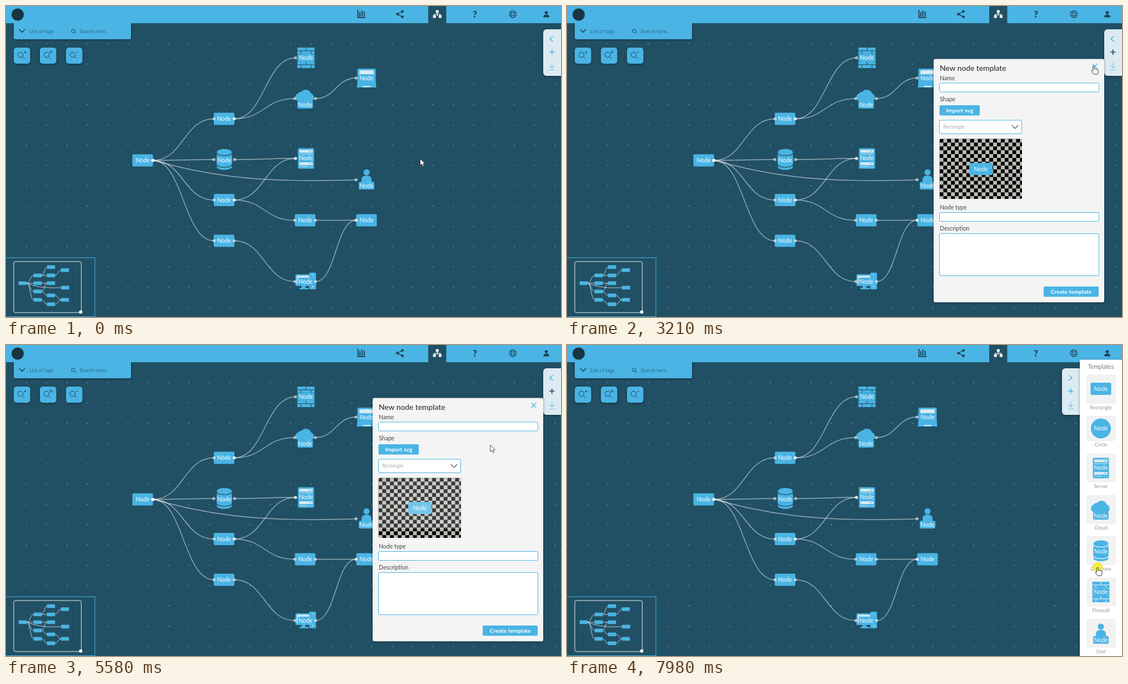
Animation of 999 by 561 pixels, one loop 8 s. Source, as an HTML page:

```html
<!DOCTYPE html>
<html lang="en">
<head>
<meta charset="utf-8">
<title>Node editor</title>
<style>
html, body { margin: 0; width: 100%; height: 100%; overflow: hidden; background: #215064; }
svg { display: block; width: 999px; height: 561px; font-family: Lato, "Open Sans", sans-serif; }
.shadow { filter: drop-shadow(0 1px 2px rgba(0, 0, 0, .4)); }
</style>
</head>
<body>
<svg id="stage" viewBox="0 0 999 561"></svg>
<script>
const BLUE = '#4ab4e4', DARK = '#215064', INK = '#1d4356', PALE = '#dceaf1';

const rect = (x, y, w, h, fill = BLUE, r = 0, extra = '') =>
  `<rect x="${x}" y="${y}" width="${w}" height="${h}" rx="${r}" fill="${fill}" ${extra}/>`;
const circle = (x, y, r, fill = BLUE, extra = '') =>
  `<circle cx="${x}" cy="${y}" r="${r}" fill="${fill}" ${extra}/>`;
const fillPath = (d, fill = BLUE) => `<path d="${d}" fill="${fill}"/>`;
const line = (d, color, width = 1, extra = '') =>
  `<path d="${d}" fill="none" stroke="${color}" stroke-width="${width}" ${extra}/>`;
const text = (s, x, y, size, fill, anchor = 'start', weight = 400) =>
  `<text x="${x}" y="${y + size * .35}" font-size="${size}" fill="${fill}" text-anchor="${anchor}" font-weight="${weight}">${s}</text>`;
const group = (x, y, body, extra = '') => `<g transform="translate(${x} ${y})" ${extra}>${body}</g>`;
const label = y => text('Node', 0, y, 10.5, '#fff', 'middle');
const tag = (y, x = 0) => group(x, 0, rect(-14, y - 7, 28, 14, BLUE, 2.5) + label(y));

// Node shapes around their centre; gap is the colour seen through the seams.
const shapes = {
  rectangle: () => rect(-18.5, -11, 37, 22, BLUE, 2) + label(0),
  circle: () => circle(0, 0, 18) + label(0),
  server: () => {
    const slot = y => rect(-12, y, 24, 5, PALE, .5) + line(`M5 ${y + 2.5}H10`, BLUE);
    return rect(-14.5, -18.5, 29, 37, BLUE, 2) + slot(-15.5) + slot(-8.5) + slot(7) +
      line('M-12 14.8H3', PALE) + circle(7, 15, .8, PALE) + circle(10, 15, .8, PALE) + tag(-.5);
  },
  cloud: () => fillPath('M-12 4.5a7 7 0 0 1-1-13.5a6 6 0 0 1 6-3a10.5 10.5 0 0 1 18 3a7.5 7.5 0 0 1 1 13.5z') + tag(11),
  database: gap => {
    const seam = y => line(`M-14 ${y}C-11 ${y + 6.5} 11 ${y + 6.5} 14 ${y}`, gap, 1.3);
    return fillPath('M-13.5-13C-13.5-21 13.5-21 13.5-13V13C13.5 20.5-13.5 20.5-13.5 13Z') +
      seam(-12) + seam(-1) + seam(9) + tag(1);
  },
  firewall: gap => {
    let bricks = rect(-15.5, -18.5, 31, 37);
    for (let i = 0; i < 6; i++) {
      const y = -18.5 + i * 6.25;
      if (i) bricks += line(`M-15.5 ${y - .4}h31`, gap, 1.1);
      const seams = i % 2 ? [-9, 9] : [0];
      for (const x of seams) bricks += line(`M${x} ${y}v6`, gap, 1.1);
    }
    return bricks + tag(0);
  },
  user: () => circle(0, -12, 5.5) + fillPath('M-9 6V1Q-9-6 0-6T9 1V6Z') + tag(12),
  laptop: () => rect(-16.5, -17, 33, 28, BLUE, 2.5) + rect(-13, -14, 26, 20, PALE, 1.5) +
    fillPath('M-16.5 7H16.5L17.5 17H-17.5Z') + rect(-7, 14.5, 14, 1.6, '#fff') + tag(0),
  desktop: () => rect(-18, -13, 26, 21, BLUE, 1.5) + rect(-15.5, -10.5, 22, 15, PALE) +
    rect(-7, 8, 7, 4) + rect(-11, 11.5, 17, 2.5, BLUE, 1) + rect(7, -16, 12, 30, BLUE, 1.5) +
    circle(13, -12, .8, '#fff') + circle(13, 9, 1, '#fff') + tag(0)
};

// shape, centre, centre in the minimap
const nodes = {
  root: ['rectangle', 246, 278.5, 30, 500],
  a: ['rectangle', 392.5, 203.5, 57, 486],
  db: ['database', 393, 277, 57, 500],
  b: ['rectangle', 392.5, 350, 57, 515],
  c: ['rectangle', 392.5, 423.5, 57, 530],
  wall: ['firewall', 540, 93.5, 81, 471],
  cloud: ['cloud', 538.5, 167, 81, 486],
  server: ['server', 540, 275, 81, 500],
  d: ['rectangle', 538.5, 386.5, 81, 522],
  pc: ['desktop', 539, 497, 81, 538],
  laptop: ['laptop', 649, 130, 106, 476.5],
  user: ['user', 649, 313.5, 106.5, 508],
  e: ['rectangle', 649, 386.5, 106, 530]
};
const edges = ('root-a root-db root-b root-c root-user a-wall a-cloud cloud-laptop db-server ' +
  'b-server b-d d-e c-pc pc-e').split(' ').map(e => e.split('-'));

function curve(x1, y1, x2, y2, long) {
  const w = x2 - x1, h = y2 - y1;
  return long
    ? `M${x1} ${y1}C${x1 + w * .25} ${y1 + h * .68} ${x1 + w * .46} ${y1 + h * 1.2} ${x2} ${y2}`
    : `M${x1} ${y1}C${x1 + w / 2} ${y1} ${x2 - w / 2} ${y2} ${x2} ${y2}`;
}

function graph() {
  let wires = '', ports = '', bodies = '';
  for (const [from, to] of edges) {
    const [, x1, y1] = nodes[from], [, x2, y2] = nodes[to];
    const start = x1 + 18.4, end = x2 - (to === 'a' || to === 'c' || to === 'b' ? 18 : 18.8);
    wires += line(curve(start, y1, end, y2, to === 'user'), 'rgba(255,255,255,.52)', 1.4);
    ports += circle(start, y1, 2.8, '#fff', 'opacity=".55"') + circle(end, y2, 2.8, '#fff', 'opacity=".55"');
  }
  for (const [shape, x, y] of Object.values(nodes))
    bodies += group(x, shape === 'user' ? y - 1.5 : y, shapes[shape](DARK));
  return wires + bodies + ports;
}

function minimap() {
  let out = rect(-1, 454, 161, 106.5, DARK, 0, `stroke="${BLUE}"`) +
    rect(14, 461, 121.5, 92, 'none', 3, 'stroke="#e6eef2"');
  for (const [from, to] of edges) {
    const [, , , x1, y1] = nodes[from], [, , , x2, y2] = nodes[to];
    out += line(curve(x1 + 7, y1, x2 - 7, y2, to === 'user'), '#e6eef2', .8);
  }
  for (const [, , , x, y] of Object.values(nodes)) out += rect(x - 7.3, y - 3.3, 14.6, 6.6);
  return out + circle(134.5, 552, 3, '#fff');
}

function header() {
  const zoom = (x, sign) => rect(x, 75, 29.5, 29, BLUE, 5, 'class="shadow"') +
    circle(x + 12, 88, 4.7, 'none', `stroke="${INK}"`) + line(`M${x + 15.5} 91.5l4 4`, INK) +
    line(sign, INK, .9);
  return rect(14, 25, 211, 35, BLUE, 3, 'class="shadow"') + rect(0, 0, 999, 31) +
    circle(21, 15.5, 11, '#183543') +
    line('M24 42l5 5.5l5-5.5', INK, 1.6) + text('List of tags', 42, 45.5, 9.2, '#2b6c8a') +
    circle(121, 45, 3.1, 'none', `stroke="${INK}"`) + line('M123.3 47.3l2.7 2.7', INK) +
    text('Search here..', 132.5, 46, 9, '#2b6c8a') +
    zoom(14, 'M32.5 83.5h4M34.5 81.5v4') + zoom(61, 'M79.5 81.5h3v3h-3z') + zoom(108, 'M126.5 83.5h3.5') +
    line('M633.5 7V20.8H647M637 11v8M640.7 8v11M644.7 10v9', INK, 2) +
    line('M713.5 9.8L704.5 14.7L713.5 19.7', INK, 1.4) + circle(713.5, 9.8, 2.4, INK) +
    circle(704.5, 14.7, 2.4, INK) + circle(713.5, 19.7, 2.4, INK) +
    rect(760, 0, 32.5, 31, DARK) + line('M776.3 11v7M771 18v-3h10.6v3', '#fff', 1.2) +
    rect(773.8, 7.5, 5, 5, '#fff') + rect(768.7, 16.5, 5, 5, '#fff') + rect(778.9, 16.5, 5, 5, '#fff') +
    text('?', 844, 14.7, 17, INK, 'middle', 900) +
    circle(912.3, 14.7, 6.2, 'none', `stroke="${INK}" stroke-width="1.1"`) +
    `<ellipse cx="912.3" cy="14.7" rx="2.8" ry="6.2" fill="none" stroke="${INK}"/>` +
    line('M906.3 12.5h12M906.3 17h12', INK) +
    circle(972.5, 12, 2.8, INK) + fillPath('M967.3 20.5v-1q0-4 5.2-4t5.2 4v1z', INK);
}

const toolbar = () => rect(967, 42, 40, 84, PALE, 6, 'class="shadow"') +
  `<g id="arrow">${line('M984.5 54.5l-5.5 4.7l5.5 4.7', BLUE, 1.5)}</g>` +
  `<path id="plus" d="M978 83.3h9.4M982.7 78.6v9.4" stroke-width="1.6"/>` +
  line('M982.7 102.5v9M978.5 108l4.2 4l4.2-4M977.5 115.5h10.4', '#7cc6e9', 1.2);

function modal() {
  const field = (y, h, w = 287) => rect(670.5, y, w, h, '#fff', 2.5, `stroke="${BLUE}"`);
  const caption = (s, y) => text(s, 671, y, 10.5, '#444');
  const button = (s, x, y, w) => rect(x, y, w, 18.5, BLUE, 2.5) +
    text(s, x + w / 2, y + 9.3, 10.3, '#fff', 'middle', 700);
  const options = ['Rectangle', 'Circle', 'Server', 'Cloud', 'Database'];
  return rect(660, 95.5, 307, 439, '#f4f4f4', 3, 'class="shadow"') +
    text('New node template', 671, 112, 13.8, '#333', 'start', 500) +
    '<path id="close" d="M945.5 104.3l9 9m0-9l-9 9" stroke-width="1.4"/>' +
    caption('Name', 130) + field(139, 16) +
    caption('Shape', 168) + button('Import svg', 670.5, 179, 72.5) +
    field(206, 24.5, 148) + text('Rectangle', 677, 218, 9, '#aaa') + line('M801 215l5.5 6l5.5-6', '#666', 1.4) +
    rect(670.5, 239.5, 148.5, 108.5, 'url(#checker)', 3) + group(745, 294, rect(-21, -11, 42, 22, BLUE, 2.5) + label(0)) +
    caption('Node type', 363.5) + field(372.5, 16) + caption('Description', 401.5) + field(410.5, 76) +
    button('Create template', 858, 506, 99) +
    `<g id="dropdown">${rect(670.5, 231, 148.5, 101, '#fff', 2, 'class="shadow"')}` +
    options.map((s, i) => text(s, 677, 242 + i * 20, 9, '#888')).join('') + '</g>';
}

function templates() {
  // shape, card top, card height, icon centre, caption
  const cards = [
    ['rectangle', 54, 51, 79, 'Rectangle'], ['circle', 128.5, 44, 150.5, 'Circle'],
    ['server', 196, 51, 222, 'Server'], ['cloud', 271, 51, 297, 'Cloud'],
    ['database', 345.5, 51, 371.5, 'Database'], ['firewall', 420, 51, 445.5, 'Firewall'],
    ['user', 494.5, 51, 520, 'User']];
  return rect(923, 26.5, 80, 540, '#fff', 0, 'class="shadow"') + '<g id="cards">' +
    text('Templates', 961, 39.5, 10.5, '#777', 'middle') +
    cards.map(([shape, y, h, cy, name]) => rect(936, y, 51, h, '#f2f2f2', 3, 'stroke="#e6e6e6" stroke-width=".6"') +
      group(961, cy, shapes[shape]('#f2f2f2')) + text(name, 961, y + h + 7.5, 9.1, '#999', 'middle')).join('') + '</g>';
}

let dots = '';
for (let y = 68; y < 561; y += 36.6)
  for (let x = 0; x < 999; x += 36.6) dots += circle(x.toFixed(1), y.toFixed(1), .75, '#a9bfc9');

const stage = document.getElementById('stage');
stage.innerHTML = `<defs><pattern id="checker" x="670.5" y="239.5" width="13.8" height="13.8" patternUnits="userSpaceOnUse">
  ${rect(0, 0, 13.8, 13.8, '#000') + rect(6.9, 0, 6.9, 6.9, '#bdbdb8') + rect(0, 6.9, 6.9, 6.9, '#bdbdb8')}</pattern></defs>` +
  rect(0, 0, 999, 561, DARK) + dots + graph() + minimap() + header() +
  `<g id="toolbar">${toolbar()}</g><g id="panel">${templates()}</g><g id="modal">${modal()}</g>` +
  `<g id="cursor">${circle(0, 0, 9.3, '#f6e71c', 'id="halo" opacity=".8"')}
  <path id="pointer" fill="#fff" stroke="#222" stroke-width=".8" stroke-linejoin="round" d="M0 0V12.2L2.9 9.6L4.9 14L6.9 13.1L5 8.8H8.8Z"/>
  <path id="hand" fill="#fff" stroke="#222" stroke-width=".9" stroke-linejoin="round" d="M-1.2 9V.8Q0-.9 1.2.8V5.6Q2.5 4.6 3.6 6Q5 5.2 6 6.6Q8.2 6 8.2 8V11L6.8 15.2H.2L-3.8 9.6Q-3.6 7.4-1.2 9Z"/></g>`;

const part = Object.fromEntries([...stage.querySelectorAll('[id]')].map(el => [el.id, el]));
const set = (name, key, value) => part[name].setAttribute(key, value);
const show = (name, alpha) => {
  set(name, 'opacity', alpha);
  set(name, 'display', alpha > 0 ? 'inline' : 'none');
};
const ramp = (t, from, to) => Math.min(1, Math.max(0, (t - from) / (to - from)));
const smooth = u => u * u * (3 - 2 * u);
const within = (t, spans) => spans.some(([from, to]) => t >= from && t < to);

// start, end, target, control point, time warp
const moves = [
  [310, 2000, 986, 80.5, 851, 126, .7],
  [2400, 3230, 948, 108, 972, 97, 1],
  [3640, 4150, 805.5, 210, 880, 155, 1],
  [5300, 6080, 951, 112, 901, 177, .85],
  [6200, 6850, 978, 54.5, 962, 85, 1],
  [7180, 7860, 955, 401, 955, 190, 1]];
const clicks = [[2050, 2200], [4330, 4430], [5200, 5340], [6150, 6250], [6890, 7030], [7890, 8000]];
const hands = [[3100, 3750], [3990, 5400], [7420, 8000]];

function cursorAt(t) {
  let x = 745.5, y = 275.5;
  for (const [from, to, endX, endY, midX, midY, warp] of moves) {
    if (t < from) break;
    const s = smooth(ramp(t, from, to) ** warp), r = 1 - s;
    x = r * r * x + 2 * r * s * midX + s * s * endX;
    y = r * r * y + 2 * r * s * midY + s * s * endY;
  }
  return [x, y];
}

function render() {
  const t = performance.now() % 8000;
  const [x, y] = cursorAt(t);
  set('cursor', 'transform', `translate(${x} ${y})`);
  show('halo', within(t, clicks) ? .8 : 0);
  const hand = within(t, hands);
  show('hand', hand ? 1 : 0);
  show('pointer', hand ? 0 : 1);

  const opening = smooth(ramp(t, 2050, 2250));
  const scale = .7 + .3 * opening;
  set('modal', 'transform', `translate(813.5 315) scale(${scale}) translate(-813.5 -315)`);
  show('modal', opening * (1 - ramp(t, 6170, 6270)));
  show('dropdown', smooth(ramp(t, 4420, 4700)) * (1 - smooth(ramp(t, 5320, 5700))));
  set('close', 'stroke', within(t, [[3240, 3760], [6010, 6300]]) ? INK : BLUE);
  set('plus', 'stroke', within(t, [[1700, 7010]]) ? INK : BLUE);

  const slide = smooth(ramp(t, 7000, 7370));
  set('toolbar', 'transform', `translate(${-76 * slide} 0)`);
  set('arrow', 'transform', `rotate(${180 * slide} 982 59.2)`);
  set('panel', 'transform', `translate(${76 * (1 - slide)} 0)`);
  set('cards', 'transform', `translate(0 ${19 * (1 - slide)})`);
  show('panel', slide);
  requestAnimationFrame(render);
}
render();
</script>
</body>
</html>
```
